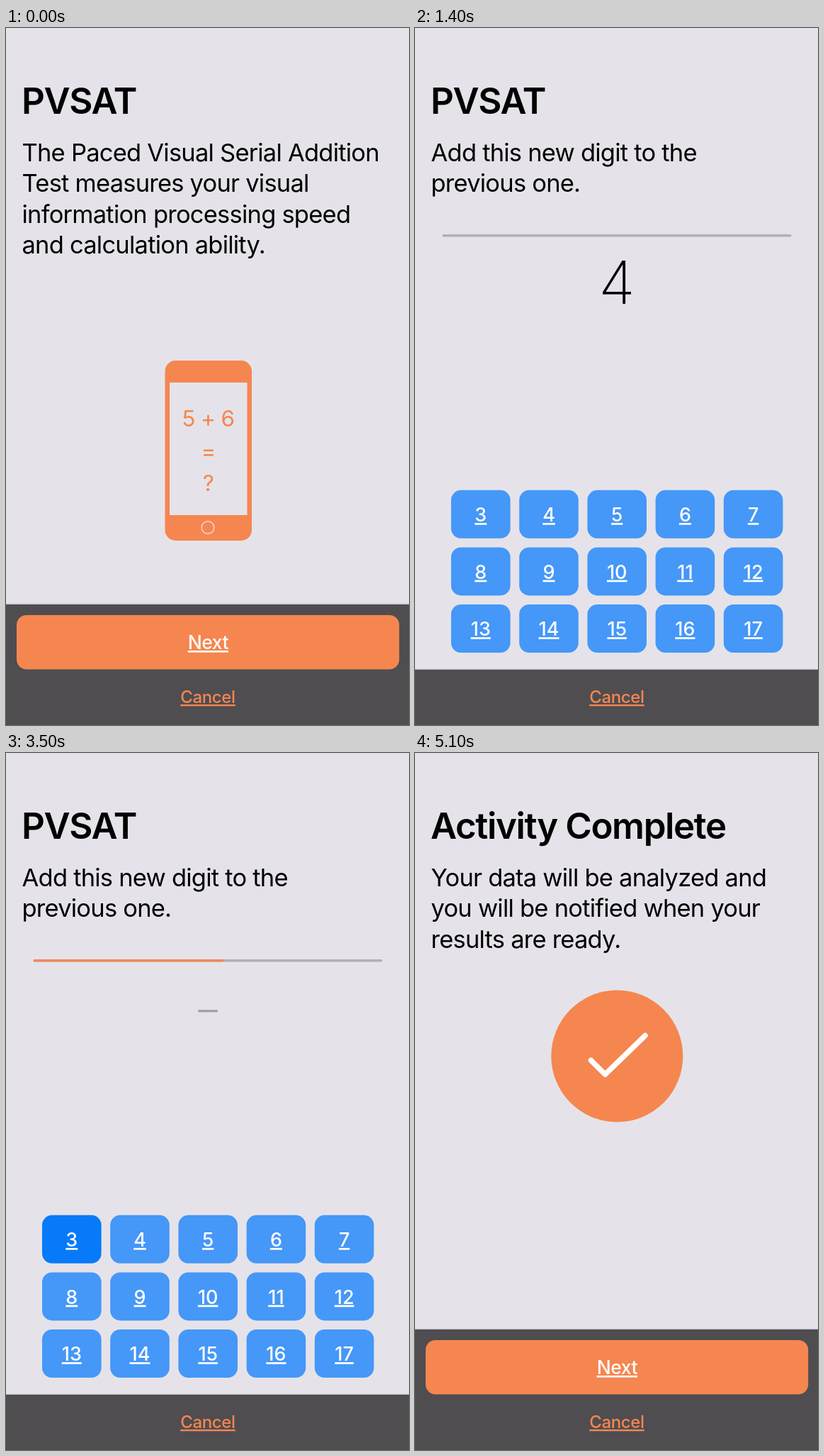
Recreate the animation shown at these times as an HTML page. Size 569 by 983 pixels, loop 5200 ms.

```html
<!DOCTYPE html>
<html lang="en">
<head>
<meta charset="utf-8">
<title>PVSAT</title>
<style>
html, body { margin: 0; width: 100%; height: 100%; overflow: hidden; background: #e5e3e9; }
svg { display: block; width: 100%; height: 100%; }
text { font-family: Inter, Roboto, sans-serif; font-optical-sizing: none; white-space: pre; }
.title { font-size: 51px; font-weight: 600; letter-spacing: -.027em; }
.body { font-size: 34.5px; letter-spacing: -.0225em; }
.mid { text-anchor: middle; }
.big { font-size: 84px; font-weight: 200; }
.link { font-weight: 500; text-decoration: underline; text-decoration-skip-ink: none; }
.key { font-size: 27px; fill: #fff; }
.next { font-size: 26.5px; fill: #fff; letter-spacing: -.02em; }
.cancel { font-size: 24px; fill: #f58650; letter-spacing: -.015em; }
.sum { font-size: 31.5px; fill: #f58650; letter-spacing: -.02em; }
.line { fill: none; stroke: #f58650; }
</style>
</head>
<body>
<svg id="stage" viewBox="0 0 569 983" preserveAspectRatio="none">
  <rect width="569" height="983" fill="#e5e3e9"/>
  <text id="title" class="title" x="22" y="121"></text>
  <g id="copy"></g>
  <path id="back" class="line" d="M39 19L25.5 32L39 45" stroke-width="1.8"/>

  <g id="phone">
    <rect x="224.5" y="469" width="122.5" height="254" rx="15" fill="#f58650"/>
    <rect x="231" y="500" width="109.5" height="187" fill="#e5e3e9"/>
    <circle cx="285" cy="704.5" r="8.8" fill="none" stroke="#f0dcd8" stroke-width="1.5"/>
    <text class="sum mid" x="285.5" y="562">5 + 6</text>
    <text class="sum mid" x="285.5" y="607.5">=</text>
    <text class="sum mid" x="285.5" y="653">?</text>
  </g>

  <g id="count">
    <text class="body mid" x="284.2" y="450.7">Starting activity in</text>
    <path id="arc" class="line" stroke-width="1.6"/>
    <text id="secs" class="big mid" x="285.3" y="579.7"></text>
  </g>

  <g id="task">
    <rect x="38.5" y="291" width="493" height="3.4" rx="1.7" fill="#b2b0b6"/>
    <rect id="bar" x="38.5" y="291" height="3.4" rx="1.7" fill="#ee8a58"/>
    <text id="digit" class="big mid" x="285" y="388.5"></text>
    <rect id="dash" x="271" y="362.3" width="28" height="3.2" rx="1.4" fill="#a09fa2"/>
    <g id="keys"></g>
  </g>

  <g id="done">
    <circle cx="285.3" cy="427.5" r="93" fill="#f58650"/>
    <path id="tick" d="M248.5 433.5L268.5 453.3L325 398.5" pathLength="1" fill="none"
      stroke="#fff" stroke-width="7.5" stroke-linecap="round" stroke-linejoin="round"/>
  </g>

  <rect id="edge" width="569" height="1.5" fill="#cbc8ce"/>
  <rect id="foot" width="569" height="180" fill="#4f4d50"/>
  <g id="next">
    <rect x="15" y="828" width="540.2" height="76.5" rx="14" fill="#f58650"/>
    <text class="link next mid" x="285.3" y="876">Next</text>
  </g>
  <text class="link cancel mid" x="285" y="952">Cancel</text>
</svg>
<script>
const LOOP = 5200, STEP = 100;
const BACK_AT = 300, COUNT_AT = 700, TASK_AT = 1300, DONE_AT = 4900;
const TRIALS = 11, TRIAL = (DONE_AT - TASK_AT) / TRIALS, SHOWN = TRIAL / 3;
const DIGITS = [4, 7, 3, 5, 4, 2, 1, 6, 5, 9, 4];
const ANSWERS = [0, 11, 3, 8, 9, 6, 3, 7, 11, 14, 13];
const COPY = {
  intro: ['The Paced Visual Serial Addition', 'Test measures your visual',
    'information processing speed', 'and calculation ability.'],
  count: [],
  task: ['Add this new digit to the', 'previous one.'],
  done: ['Your data will be analyzed and', 'you will be notified when your', 'results are ready.']
};

const $ = id => document.getElementById(id);
const show = (id, on) => $(id).setAttribute('display', on ? 'inline' : 'none');
const set = (el, attrs) => { for (const k in attrs) el.setAttribute(k, attrs[k]); };

function add(parent, tag, attrs, text = '') {
  const el = document.createElementNS('http://www.w3.org/2000/svg', tag);
  set(el, attrs);
  el.textContent = text;
  parent.appendChild(el);
  return el;
}

const keys = Array.from({ length: 15 }, (_, i) => {
  const x = 51 + (i % 5) * 96.2, y = 651.8 + Math.floor(i / 5) * 80.6;
  const box = add($('keys'), 'rect', { x, y, width: 83.6, height: 68, rx: 14 });
  add($('keys'), 'text', { class: 'link key mid', x: x + 41.8, y: y + 44.2 }, i + 3);
  return box;
});

let scene = '';
function setScene(name) {
  if (name === scene) return;
  scene = name;
  const panel = name === 'intro' || name === 'done';
  const top = panel ? 813 : 905;
  $('title').textContent = name === 'done' ? 'Activity Complete' : 'PVSAT';
  $('copy').textContent = '';
  COPY[name].forEach((line, i) =>
    add($('copy'), 'text', { class: 'body', x: 22.5, y: 187.7 + i * 43.5 }, line));
  show('phone', name === 'intro');
  show('count', name === 'count');
  show('task', name === 'task');
  show('done', name === 'done');
  show('next', panel);
  set($('foot'), { y: top });
  set($('edge'), { y: top - 1.5 });
}

function drawCount(t) {
  const secs = 0.61 + (t - COUNT_AT) * 3 / TRIAL;
  const a = Math.min(secs / 5, 1) * 2 * Math.PI;
  const r = 79.5, x = 285.3 + r * Math.sin(a), y = 553.7 - r * Math.cos(a);
  set($('arc'), { d: `M${x} ${y}A${r} ${r} 0 ${a < Math.PI ? 1 : 0} 1 285.3 ${553.7 - r}` });
  $('secs').textContent = Math.max(1, 5 - Math.floor(secs));
}

function drawTask(t) {
  const k = Math.min(TRIALS - 1, Math.floor((t - TASK_AT) / TRIAL));
  const phase = t - TASK_AT - k * TRIAL;
  const visible = phase < SHOWN;
  const pressed = !visible || k === 2 ? ANSWERS[k] : 0;
  set($('bar'), { width: 493 * k / TRIALS });
  $('digit').textContent = visible ? DIGITS[k] : '';
  show('dash', !visible);
  keys.forEach((key, i) => set(key, { fill: i + 3 === pressed ? '#067af9' : '#4597f8' }));
}

function drawTick(t) {
  const p = Math.min(1, (t - DONE_AT) / 170);
  show('tick', p > 0);
  set($('tick'), { 'stroke-dasharray': p < 1 ? `${p} 2` : 'none' });
}

function draw(now) {
  const t = Math.floor((now % LOOP) / STEP) * STEP;
  setScene(t < COUNT_AT ? 'intro' : t < TASK_AT ? 'count' : t < DONE_AT ? 'task' : 'done');
  show('back', t >= BACK_AT && t < TASK_AT);
  if (scene === 'count') drawCount(t);
  if (scene === 'task') drawTask(t);
  if (scene === 'done') drawTick(t);
}

let start;
function tick(now) {
  if (start === undefined) start = now;
  draw(now - start);
  requestAnimationFrame(tick);
}
draw(0);
requestAnimationFrame(tick);
</script>
</body>
</html>
```
